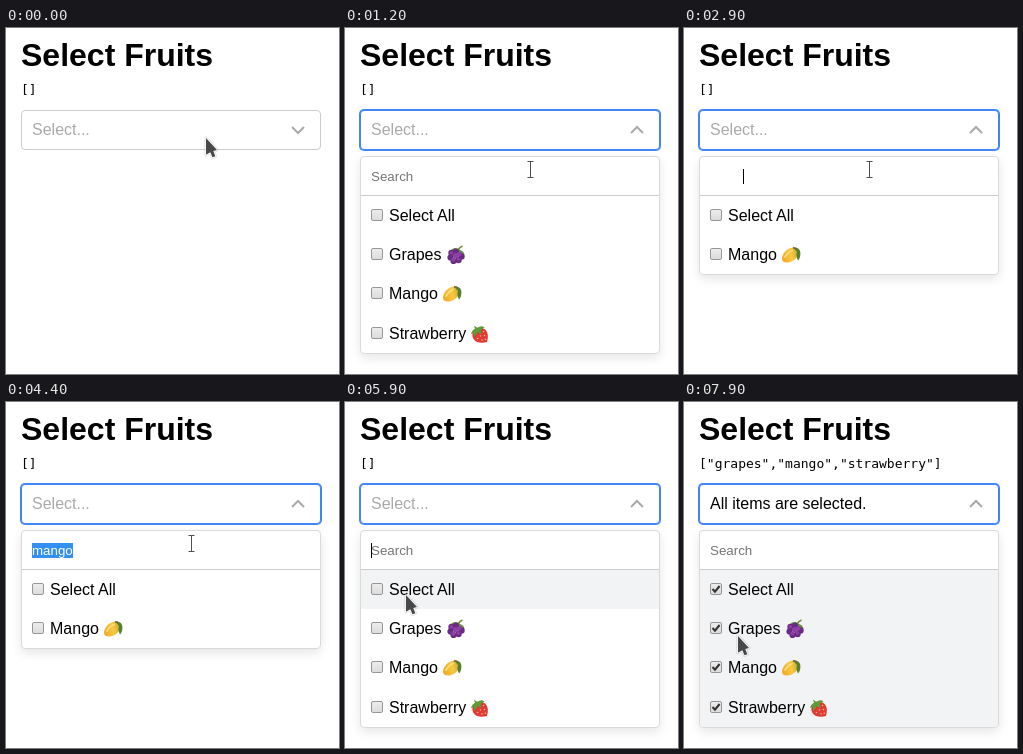
An HTML page for the animation above (8000 ms loop, 333 by 346 pixels).

```html
<!DOCTYPE html>
<html lang="en">
<head>
<meta charset="utf-8">
<title>Select Fruits</title>
<style>
  html, body { margin: 0; width: 100%; height: 100%; overflow: hidden; background: #fff; }
  body { position: relative; font: 16px/17px "Liberation Sans", Arial, sans-serif; color: #000; }
  body *, h1 { box-sizing: border-box; }
  h1, div, span.abs, svg.abs { position: absolute; margin: 0; white-space: pre; }
  h1 { left: 15px; top: 9px; font-size: 32px; line-height: 36px; }
  .value { left: 15px; top: 54px; font: 13px/15px "DejaVu Sans Mono", monospace; }

  /* every track shares one 8 s clock and changes in hard steps */
  .head, .panel, .empty, .full, .rows i, .tint, .hint, .query span, .caret, .mark,
  .grapes, .mango, .up, .down, .pointer, .arrow, .beam, .picked {
    animation: 8s step-end infinite;
  }

  .head {
    left: 15px; top: 82px; width: 300px; height: 40px;
    border: 1px solid #ccc; border-radius: 4px; background: #fff;
    animation-name: focus;
  }
  .head .label { left: 10px; top: 10px; }
  .head .empty { color: #aaa; }
  .head svg { left: 264px; top: 7px; }
  .empty { animation-name: empty; }
  .full { opacity: 0; animation-name: full; }
  .down { animation-name: closed; }
  .up { opacity: 0; animation-name: open; }

  .panel {
    left: 15px; top: 128px; width: 300px; height: 198px; overflow: hidden;
    border: 1px solid #dadada; border-radius: 4px; background: #fff;
    box-shadow: 0 4px 11px rgba(0, 0, 0, .1);
    opacity: 0; animation-name: panel;
  }
  .search {
    left: 0; top: 0; width: 298px; height: 39px; border-bottom: 1px solid #ccc;
    font-size: 13.3333px; line-height: 15px;
  }
  .search > div { left: 10px; top: 12px; height: 15px; }
  .hint { color: #757575; animation-name: hint; }
  .query span { opacity: 0; }
  .k1 { animation-name: k1; }
  .k2 { animation-name: k2; }
  .k3 { animation-name: k3; }
  .k4 { animation-name: k4; }
  .search .picked {
    width: 41px; color: #fff; background: #3390ee; opacity: 0; animation-name: picked;
  }
  .search .caret { width: 1px; background: #000; opacity: 0; animation-name: caret; }

  .tint { left: 0; top: 39px; width: 298px; height: 0; background: #f1f3f5; animation-name: tint; }
  .row { left: 0; width: 298px; height: 39px; }
  .row > span { position: absolute; left: 28px; top: 11px; }
  .row > .fruit { position: absolute; top: 10px; }
  .grapes { animation-name: grapes; }
  .mango { animation-name: mango; }
  .box {
    left: 10px; top: 13px; width: 12px; height: 12px; border: 1px solid #969696;
    border-radius: 2px; background: linear-gradient(#ececec, #dcdcdc);
  }
  .mark { position: absolute; left: -1px; top: -1px; opacity: 0; animation-name: full; }

  .pointer { left: 0; top: 0; transform: translate(200px, 110px); animation-name: move; }
  .pointer svg { left: -10px; top: -10px; }
  .arrow { animation-name: arrow; }
  .beam { opacity: 0; animation-name: beam; }

  @keyframes focus { 7.5% { border-color: #4285f4; box-shadow: 0 0 0 1px #4285f4; } }
  @keyframes focus {
    0% { border-color: #ccc; box-shadow: none; }
    7.5%, 100% { border-color: #4285f4; box-shadow: 0 0 0 1px #4285f4; }
  }
  @keyframes closed { 0% { opacity: 1; } 11.25%, 100% { opacity: 0; } }
  @keyframes open { 0% { opacity: 0; } 11.25%, 100% { opacity: 1; } }
  @keyframes empty { 0% { opacity: 1; } 78.75%, 100% { opacity: 0; } }
  @keyframes full { 0% { opacity: 0; } 78.75%, 100% { opacity: 1; } }
  @keyframes panel {
    0% { opacity: 0; height: 198px; }
    11.25% { opacity: 1; height: 198px; }
    36.25% { opacity: 1; height: 119px; }
    61.25%, 100% { opacity: 1; height: 198px; }
  }
  @keyframes hint { 0% { opacity: 1; } 30% { opacity: 0; } 61.25%, 100% { opacity: 1; } }
  @keyframes k1 { 0% { opacity: 0; } 30% { opacity: 1; } 55%, 100% { opacity: 0; } }
  @keyframes k2 { 0% { opacity: 0; } 33.75% { opacity: 1; } 55%, 100% { opacity: 0; } }
  @keyframes k3 { 0% { opacity: 0; } 36.25% { opacity: 1; } 55%, 100% { opacity: 0; } }
  @keyframes k4 { 0% { opacity: 0; } 42.5% { opacity: 1; } 55%, 100% { opacity: 0; } }
  @keyframes picked { 0% { opacity: 0; } 55% { opacity: 1; } 61.25%, 100% { opacity: 0; } }
  @keyframes caret {
    0% { opacity: 0; left: 10px; }
    22.5% { opacity: 1; left: 10px; }
    30% { opacity: 1; left: 21px; }
    33.75% { opacity: 1; left: 36px; }
    36.25% { opacity: 1; left: 43px; }
    42.5% { opacity: 1; left: 51px; }
    48.75% { opacity: 0; left: 51px; }
    61.25% { opacity: 1; left: 10px; }
    67.5% { opacity: 0; left: 10px; }
    73.75% { opacity: 1; left: 10px; }
    77.5%, 100% { opacity: 0; left: 10px; }
  }
  @keyframes tint { 0% { height: 0; } 67.5% { height: 39px; } 78.75%, 100% { height: 157px; } }
  @keyframes grapes {
    0% { transform: none; } 31.25% { transform: translateY(39px); } 61.25%, 100% { transform: none; }
  }
  @keyframes mango {
    0% { transform: none; } 31.25% { transform: translateY(-39px); } 61.25%, 100% { transform: none; }
  }
  @keyframes move {
    0% { transform: translate(200px, 110px); }
    12.5% { transform: translate(196px, 121px); }
    13.75% { transform: translate(189px, 136px); }
    15% { transform: translate(185px, 142px); }
    65% { transform: translate(178px, 146px); }
    66.25% { transform: translate(132px, 164px); }
    67.5% { transform: translate(86px, 185px); }
    68.75% { transform: translate(61px, 198px); }
    71.25% { transform: translate(61px, 197px); }
    72.5% { transform: translate(61px, 195px); }
    73.75% { transform: translate(61px, 193px); }
    96.25% { transform: translate(66px, 204px); }
    97.5% { transform: translate(61px, 222px); }
    98.75%, 100% { transform: translate(54px, 234px); }
  }
  @keyframes arrow { 0% { opacity: 1; } 13.75% { opacity: 0; } 67.5%, 100% { opacity: 1; } }
  @keyframes beam { 0% { opacity: 0; } 13.75% { opacity: 1; } 67.5%, 100% { opacity: 0; } }
</style>
</head>
<body>
  <h1>Select Fruits</h1>
  <div class="value empty">[]</div>
  <div class="value full">["grapes","mango","strawberry"]</div>

  <div class="head">
    <div class="label empty">Select...</div>
    <div class="label full">All items are selected.</div>
    <svg class="abs" width="24" height="24" fill="none" stroke="#aaa" stroke-width="2">
      <path class="down" d="M6 9L12 15 18 9"/>
      <path class="up" d="M18 15L12 9 6 15"/>
    </svg>
  </div>

  <div class="panel">
    <div class="search">
      <div class="hint">Search</div>
      <div class="query"><span class="k1">m</span><span class="k2">an</span><span class="k3">g</span><span class="k4">o</span></div>
      <div class="picked">mango</div>
      <div class="caret"></div>
    </div>
    <div class="tint"></div>

    <div class="row" style="top:39px">
      <div class="box"><svg class="mark" width="12" height="12"><path d="M2.5 6L5 8.7 9.6 3" fill="none" stroke="#333" stroke-width="2.1"/></svg></div>
      <span>Select All</span>
    </div>

    <div class="row grapes" style="top:78px">
      <div class="box"><svg class="mark" width="12" height="12"><path d="M2.5 6L5 8.7 9.6 3" fill="none" stroke="#333" stroke-width="2.1"/></svg></div>
      <span>Grapes</span>
      <svg class="fruit" style="left:85px" width="20" height="20">
        <path d="M12 5Q14 2 16.5 1" fill="none" stroke="#6d8c2c" stroke-width="1.8"/>
        <path d="M5 5Q9 1 14 5Q18 6 18.5 10L12 8Z" fill="#5d9438"/>
        <g fill="#6a2c82">
          <circle cx="5.5" cy="8" r="3.2"/><circle cx="15.5" cy="11.5" r="3.2"/>
          <circle cx="4.5" cy="12.5" r="3.1"/><circle cx="12.5" cy="15" r="3.2"/>
          <circle cx="7.5" cy="16" r="3.1"/><circle cx="10" cy="6.5" r="3"/>
        </g>
        <g fill="#8d3fa6">
          <circle cx="9.5" cy="10.5" r="2.6"/><circle cx="13.5" cy="9" r="2.2"/>
          <circle cx="5.3" cy="7.8" r="1.8"/><circle cx="7.3" cy="14.5" r="2"/>
          <circle cx="12.3" cy="14" r="1.7"/>
        </g>
      </svg>
    </div>

    <div class="row mango" style="top:117px">
      <div class="box"><svg class="mark" width="12" height="12"><path d="M2.5 6L5 8.7 9.6 3" fill="none" stroke="#333" stroke-width="2.1"/></svg></div>
      <span>Mango</span>
      <svg class="fruit" style="left:81px" width="20" height="20">
        <defs>
          <linearGradient id="peel" x1="0" y1=".6" x2="1" y2=".4">
            <stop offset=".1" stop-color="#f3ad2c"/><stop offset=".55" stop-color="#f9c940"/>
            <stop offset="1" stop-color="#c9a935"/>
          </linearGradient>
        </defs>
        <path d="M1 14C1 9 6 3 12 2.5C17 2 19 6 17 10C15 15 10 17.5 6 17.5C3 17.5 1 16.5 1 14Z" fill="url(#peel)"/>
        <path d="M4 12Q7 7 11 5.5" fill="none" stroke="#fde07c" stroke-width="1.8" stroke-linecap="round"/>
        <path d="M12.5 3Q18 2 19.3 7Q20 12 17 15.5Q14.5 11 16 7Z" fill="#567f31"/>
        <path d="M12 2.8L15.5 3.4" stroke="#7a5b36" stroke-width="1.4"/>
      </svg>
    </div>

    <div class="row" style="top:157px">
      <div class="box"><svg class="mark" width="12" height="12"><path d="M2.5 6L5 8.7 9.6 3" fill="none" stroke="#333" stroke-width="2.1"/></svg></div>
      <span>Strawberry</span>
      <svg class="fruit" style="left:109px" width="20" height="20">
        <path d="M3 8C4 4 9 2.5 13.5 4.5C18.5 7 18.5 13 17 18C12 19.5 6 19 3.5 15C2 12.5 2.2 10 3 8Z" fill="#df3b35"/>
        <path d="M1 10Q2 6 5 5L4 1.5 7.5 4Q11 1 14.5 3.5L10.5 6Q12 8 11 10L7.5 8Q6.5 11.5 4 13L4.2 9Z" fill="#5f9a38"/>
        <g fill="#f8b58a">
          <circle cx="13.5" cy="7.5" r=".8"/><circle cx="10.5" cy="12" r=".8"/>
          <circle cx="14.5" cy="11.5" r=".8"/><circle cx="7.5" cy="14.5" r=".8"/>
          <circle cx="12" cy="16" r=".8"/><circle cx="15.3" cy="15.3" r=".8"/>
        </g>
      </svg>
    </div>
  </div>

  <div class="pointer">
    <svg class="abs arrow" width="32" height="40">
      <g transform="translate(10 10)" stroke-linejoin="round">
        <path d="M0 0L11 12 7.3 12.9 9.3 18.2 6.5 19.3 4.3 14.3 0 16.8Z" fill="#888" stroke="#000" stroke-opacity=".1" stroke-width="3.5"/>
        <path d="M0 0L11 12 7.3 12.9 9.3 18.2 6.5 19.3 4.3 14.3 0 16.8Z" fill="#484848" stroke="#fff" stroke-width="1.4" paint-order="stroke"/>
      </g>
    </svg>
    <svg class="abs beam" width="24" height="28" fill="none">
      <path d="M7.5 1.5H13.5M7.5 17.5H13.5M10.5 1.5V17.5" stroke="#fff" stroke-width="3"/>
      <path d="M7.5 1.5H13.5M7.5 17.5H13.5M10.5 1.5V17.5" stroke="#505050"/>
    </svg>
  </div>
</body>
</html>
```
